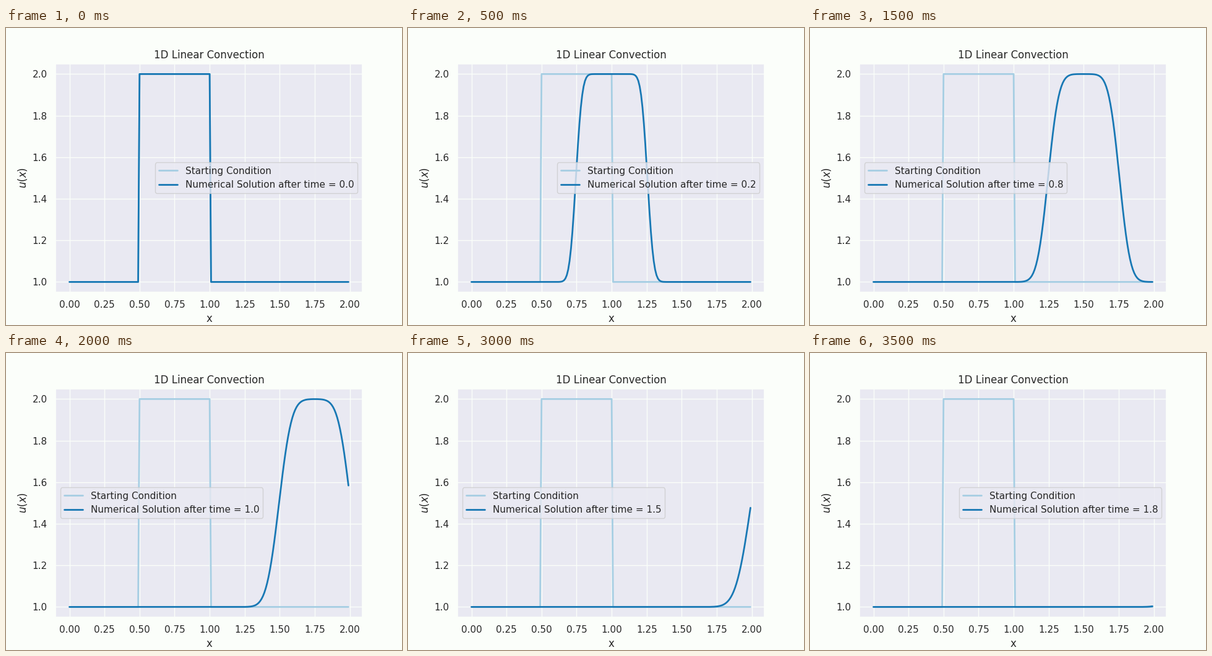
Recreate the animation shown at these times as a matplotlib script. Size 640 by 480 pixels, loop 4 s.

```python
import numpy as np
import matplotlib.pyplot as plt
from matplotlib.animation import FuncAnimation

PAPER, PANEL, INK = "#fbfefa", "#e9e9f2", "#262626"
LIGHT, DARK = "#a6cee3", "#1878b4"

plt.rcParams.update({
    "font.family": "DejaVu Sans",
    "font.size": 12,
    "text.color": INK,
    "figure.facecolor": PAPER,
    "axes.facecolor": PANEL,
    "axes.edgecolor": PAPER,
    "axes.linewidth": 1.25,
    "axes.labelcolor": INK,
    "axes.labelsize": 12,
    "axes.titlesize": 12,
    "axes.axisbelow": True,
    "axes.grid": True,
    "grid.color": PAPER,
    "grid.linewidth": 1,
    "xtick.color": INK, "xtick.labelsize": 11,
    "xtick.major.size": 6, "xtick.bottom": False,
    "ytick.color": INK, "ytick.labelsize": 11,
    "ytick.major.size": 6, "ytick.left": False,
    "legend.fontsize": 11,
    "lines.linewidth": 2,
    "lines.solid_capstyle": "round",
})

DX, DT, SPEED = 0.01, 0.005, 1.0
STEPS = 50  # solver steps between two pictures
FRAMES = 8

x = np.arange(200) * DX
start = np.ones_like(x)
start[50:101] = 2


def solve(steps):
    """Upwind scheme for u_t + c u_x = 0 with a fixed left boundary."""
    u = start.copy()
    for _ in range(steps):
        u[1:] -= SPEED * DT / DX * (u[1:] - u[:-1])
    return u


fig, ax = plt.subplots(figsize=(6.4, 4.8), dpi=100)
ax.plot(x, start, color=LIGHT, label="Starting Condition")
curve, = ax.plot(x, start, color=DARK)
ax.set_xticks(np.arange(0, 2.01, 0.25))
ax.set_yticks(np.arange(1, 2.01, 0.2))
ax.set_xlim(-0.05 * x[-1], 1.05 * x[-1])
ax.set_ylim(0.95, 2.05)
ax.set_title("1D Linear Convection")
ax.set_xlabel("x")
ax.set_ylabel("$u(x)$")


def update(i):
    steps = i * STEPS
    curve.set_ydata(solve(steps))
    curve.set_label(f"Numerical Solution after time = {steps * DT:.1f}")
    side = "left" if 2 <= i <= 6 else "right"
    ax.legend(loc=f"center {side}", framealpha=0.8, edgecolor="0.8")
    return curve,


anim = FuncAnimation(fig, update, frames=FRAMES, interval=500,
                     repeat=True, repeat_delay=0)
plt.show()
```
